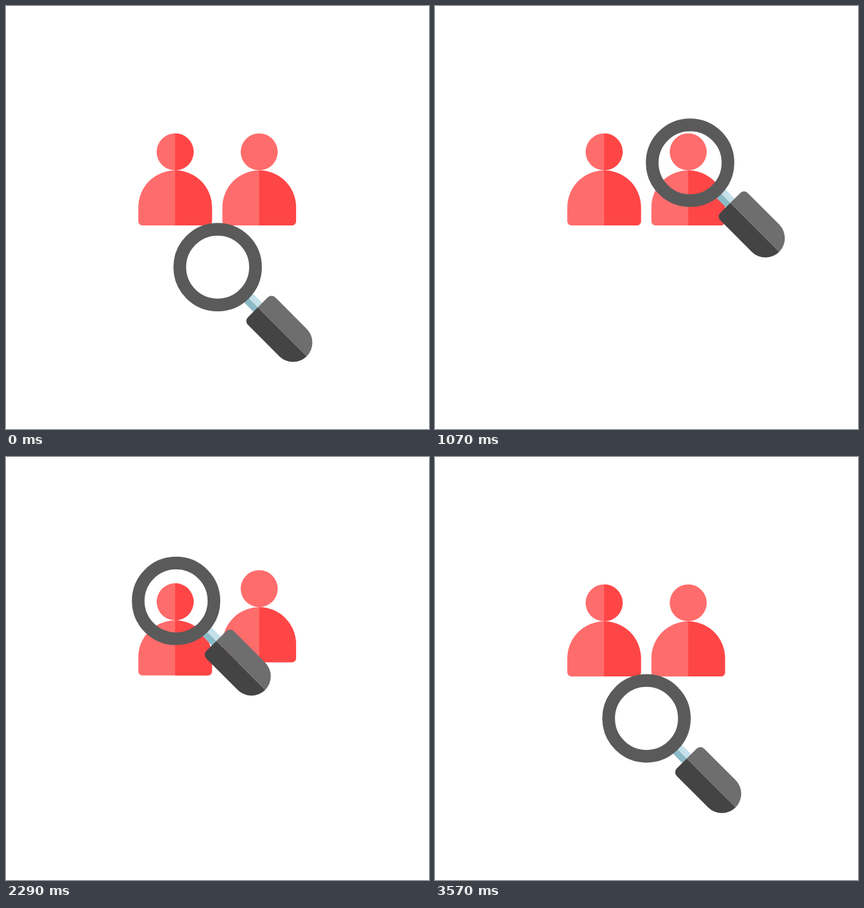
Write an HTML page that moves like this. It is 640 px wide and 640 px high and loops after 3.64 s.

```html
<!DOCTYPE html>
<html>
<head>
<meta charset="utf-8">
<style>
  html, body { margin: 0; height: 100%; overflow: hidden; background: #fff; }
  svg { display: block; width: 100%; height: 100%; }
</style>
</head>
<body>
<svg viewBox="0 0 640 640">
  <defs>
    <path id="body" d="M-55.7 304.5a55.7 55.7 0 0 1 111.4 0V326a6 6 0 0 1-6 6H-49.7a6 6 0 0 1-6-6z"/>
    <path id="bodyShade" d="M0 248.8a55.7 55.7 0 0 1 55.7 55.7V326a6 6 0 0 1-6 6H0z"/>
    <circle id="head" cy="220.7" r="28"/>
  </defs>
  <g id="left">
    <use href="#head" fill="#ff6c6c"/>
    <path d="M0 192.7a28 28 0 0 1 0 56z" fill="#ff4646"/>
    <use href="#body" fill="#ff6c6c"/>
    <use href="#bodyShade" fill="#ff4646"/>
  </g>
  <g id="right">
    <use href="#head" fill="#ff6c6c"/>
    <use href="#body" fill="#ff6c6c"/>
    <use href="#bodyShade" fill="#ff4646"/>
  </g>
  <g id="lens">
    <g transform="rotate(45)">
      <path d="M60-9.4H90V0H60z" fill="#c4e0e9"/>
      <path d="M60 0H90V9.4H60z" fill="#8bbac7"/>
      <path d="M86 0V-21.3a8 8 0 0 1 8-8H161.3A29.3 29.3 0 0 1 190.6 0z" fill="#6e6e6e"/>
      <path d="M86 0V21.3a8 8 0 0 0 8 8H161.3A29.3 29.3 0 0 0 190.6 0z" fill="#444"/>
    </g>
    <circle r="57.3" fill="none" stroke="#5a5a5a" stroke-width="19.2"/>
  </g>
</svg>
<script>
const LOOP = 3640, FPS = 14;
const KEYS = [-0.5, 16.7, 33.4, 50.1];   // lens stops, in ticks of 1/14 s
const HOP_HEIGHT = 30.7, HOPS = 4;

const legs = [
  'M320 395.5C320 395.5 395.7 261.6 385 232.4',
  'M385 232.4C374.3 203.2 266.8 193.1 256 220.2',
  'M256 220.2C245.2 247.3 320 395.5 320 395.5'
].map(d => {
  const path = document.createElementNS('http://www.w3.org/2000/svg', 'path');
  path.setAttribute('d', d);
  return path;
});

const ease = u => u * u * (3 - 2 * u);
const place = (id, x, y) =>
  document.getElementById(id).setAttribute('transform', `translate(${x} ${y})`);

function lensAt(tick) {
  const i = KEYS.findLastIndex(key => key <= tick);
  const u = (tick - KEYS[i]) / (KEYS[i + 1] - KEYS[i]);
  return legs[i].getPointAtLength(ease(u) * legs[i].getTotalLength());
}

function hop(tick, start, period) {
  const phase = (tick - start) / period;
  if (phase < 0 || phase > HOPS) return 0;
  return -HOP_HEIGHT * ease(1 - Math.abs(1 - 2 * (phase % 1)));
}

function draw(now) {
  const tick = Math.floor((now % LOOP + 5) * FPS / 1000) % 51;
  const lens = lensAt(tick);
  place('left', 255.9, hop(tick, 31.7, 4.34));
  place('right', 383.1, hop(tick, 16.5, 4.21));
  place('lens', lens.x, lens.y);
}

const begin = performance.now();
function loop() {
  draw(performance.now() - begin);
  requestAnimationFrame(loop);
}
loop();
</script>
</body>
</html>
```
